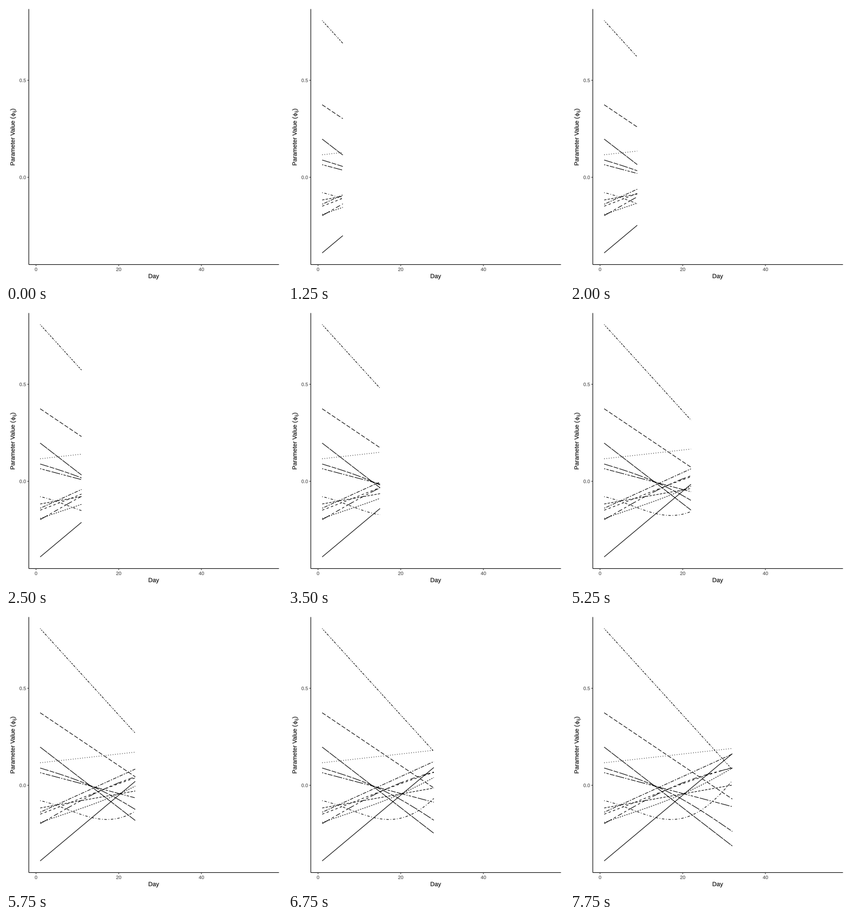
A matplotlib script that plays this animation: 500 px wide and 500 px high, repeating every 8 s.

```python
import numpy as np
import matplotlib.pyplot as plt
from matplotlib.animation import FuncAnimation
from matplotlib.patches import PathPatch
from matplotlib.textpath import TextPath
from matplotlib.transforms import Affine2D

SIZE, DPI = 500, 72
FRAMES, INTERVAL = 32, 250
LINE = 1.067
LEFT, RIGHT, TOP, BOTTOM = 41.3, 494.5, 5.5, 468.4

plt.rcParams.update({
    "lines.dash_capstyle": "butt",
    "lines.solid_capstyle": "butt",
    "path.simplify": False,
})

days = np.arange(1, FRAMES + 1)


def px(day):
    return 54.4 + 7.49 * day


def py(value):
    return 310.3 - 351.4 * value


def trend(start, end, bend=0, skew=0):
    """Straight drift from start to end, bowed by a sine that grows with skew."""
    t = np.linspace(0, 1, len(days))
    return start + (end - start) * t + (bend + skew * t) * np.sin(np.pi * t)


# Hex dash pattern -> trend
SERIES = {
    "12223242": trend(.808, .081),
    "73": trend(.374, -.071),
    "F1": trend(.197, -.313),
    "13": trend(.116, .190),
    "F282": trend(.089, -.238, .040),
    "224282F2": trend(.065, -.110),
    "1343": trend(-.079, .024, -.080, -.137),
    "42": trend(-.117, .001),
    "2262": trend(-.139, .161),
    "44": trend(-.149, .092, .002, .013),
    "22": trend(-.192, .089, -.014, -.020),
    "F4448444": trend(-.198, .089, .028, .015),
    "": trend(-.390, .163),
}


def dash(pattern):
    return (0, [int(c, 16) for c in pattern]) if pattern else "-"


# The axes cover the figure and count pixels from the top left
fig = plt.figure(figsize=(SIZE / DPI, SIZE / DPI), dpi=DPI, facecolor="white")
ax = fig.add_axes([0, 0, 1, 1])
ax.set(xlim=(0, SIZE), ylim=(SIZE, 0), autoscale_on=False)
ax.axis("off")


def rule(xs, ys, color="black"):
    ax.plot(xs, ys, color=color, lw=LINE, snap=False)


def label(x, y, text, size, color="black", align=None, angle=0,
          font="Liberation Sans"):
    """Draw text as outlines, so that it keeps its subpixel place."""
    outline = TextPath((0, 0), text, size=size, prop={"family": font})
    box = outline.get_extents()
    shift = {"center": (box.x0 + box.x1) / 2, "right": box.x1}.get(align, 0)
    place = (Affine2D().translate(-shift, 0).rotate_deg(angle)
             .scale(1, -1).translate(x, y))
    ax.add_patch(PathPatch(outline, fc=color, ec=color, lw=.12, snap=False,
                           transform=place + ax.transData))


rule([LEFT, LEFT], [TOP, BOTTOM])
rule([LEFT, RIGHT], [BOTTOM, BOTTOM])
for day in (0, 20, 40):
    rule([px(day)] * 2, [BOTTOM, BOTTOM + 2.75], "#333333")
    label(px(day), 480.1, str(day), 8.8, "#4d4d4d", "center")
for value in (0, .5):
    rule([LEFT - 2.75, LEFT], [py(value)] * 2, "#333333")
    label(36, py(value) + 3.2, f"{value:.1f}", 8.8, "#4d4d4d", "right")
label(267.9, 493, "Day", 11, align="center")

# Vertical title: text, symbol, subscript, closing bracket
base = 15.7
label(base, 289.3, "Parameter Value (", 11, angle=90)
label(base, 199.9, "\u03d5", 9, angle=90, font="DejaVu Serif")
label(base + 2, 193.2, "ij", 7.7, angle=90)
label(base, 189.3, ")", 11, angle=90)

lines = [ax.plot([], [], color="black", lw=LINE, ls=dash(pattern))[0]
         for pattern in SERIES]


def draw(frame):
    shown = frame + 1 if frame else 0
    for line, values in zip(lines, SERIES.values()):
        line.set_data(px(days[:shown]), py(values[:shown]))
    return lines


anim = FuncAnimation(fig, draw, frames=FRAMES, interval=INTERVAL,
                     init_func=lambda: draw(0), repeat=True, repeat_delay=0)
plt.show()
```
